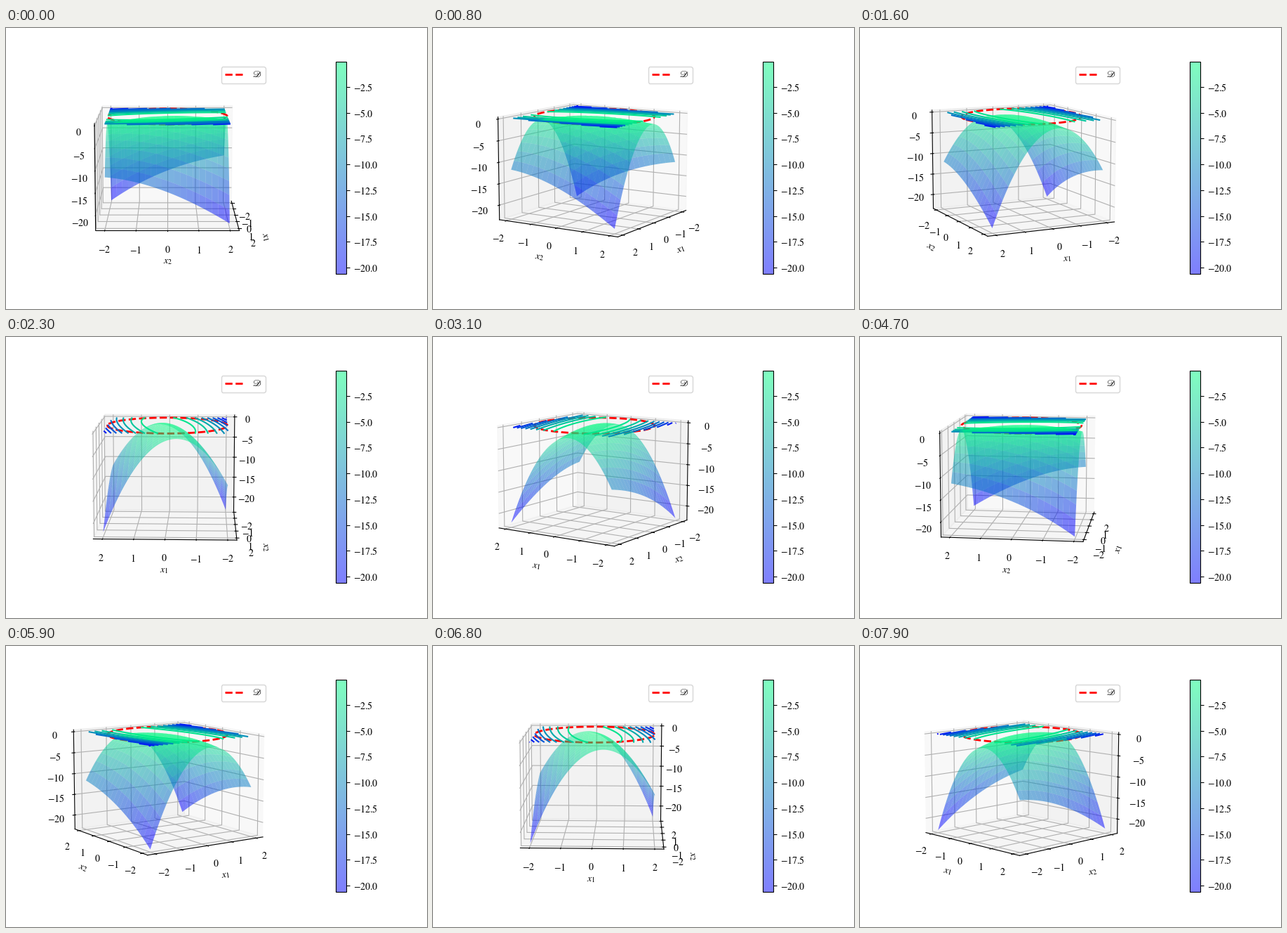
Recreate the animation shown at these times as a matplotlib script. Size 600 px wide and 400 px high, loop 8 s.

```python
import numpy as np
import matplotlib.pyplot as plt
from matplotlib.animation import FuncAnimation

plt.rcParams.update({
    "font.family": "Liberation Serif",
    "font.size": 10,
    "mathtext.fontset": "stix",
})

FRAMES, INTERVAL, STEP = 80, 100, 4
ELEV, RADIUS, FLOOR = 10, 2, -22.95


def vdot(x, y):
    """Nearly quadratic decay rate with a slight odd part."""
    return -(3.81 * x**2 + 1.36 * x * y + 0.47 * y**2) + 0.025 * y**3 + 0.009 * x**3


def padded(lo, hi):
    pad = (hi - lo) / 48
    return lo - pad, hi + pad


fig = plt.figure(figsize=(6, 4), dpi=100)
ax = fig.add_axes([0.125, 0.125, 302 / 600, 0.755], projection="3d")
cax = fig.add_axes([470.25 / 600, 0.125, 15.1 / 600, 0.755])

grid = np.linspace(-2, 2, 100)
X, Y = np.meshgrid(grid, grid)
Z = vdot(X, Y)
surf = ax.plot_surface(X, Y, Z, rstride=5, cstride=5, cmap="winter", alpha=0.5)

# One contour set per level, so each is depth-sorted on its own
levels = np.arange(-22.5, 0, 2.5)
for level in levels:
    color = plt.cm.winter(1 - level / levels[0])
    ax.contour(X, Y, Z, levels=[level], colors=[color],
               linestyles="solid", zdir="z", offset=0)

t = np.linspace(0, 2 * np.pi, 200)
ax.plot(RADIUS * np.cos(t), RADIUS * np.sin(t), 0 * t, "r--", lw=2,
        label=r"$\mathscr{D}$")

ax.set_xlim(*padded(-2.2, 2.2))
ax.set_ylim(*padded(-2.2, 2.2))
ax.set_zlim(*padded(FLOOR, 0))
ax.set_xticks(range(-2, 3))
ax.set_yticks(range(-2, 3))
ax.set_zticks(range(-20, 1, 5))
for axis in (ax.xaxis, ax.yaxis, ax.zaxis):
    axis.set_major_formatter("${x:.0f}$")
ax.set_xlabel("$x_1$")
ax.set_ylabel("$x_2$")
ax.legend(loc="upper right")
fig.colorbar(surf, cax=cax, format="$%.1f$")


def update(i):
    ax.view_init(elev=ELEV, azim=STEP * i)
    return []


anim = FuncAnimation(fig, update, frames=FRAMES, interval=INTERVAL,
                     repeat=True, repeat_delay=0, init_func=lambda: update(0))
plt.show()
```
